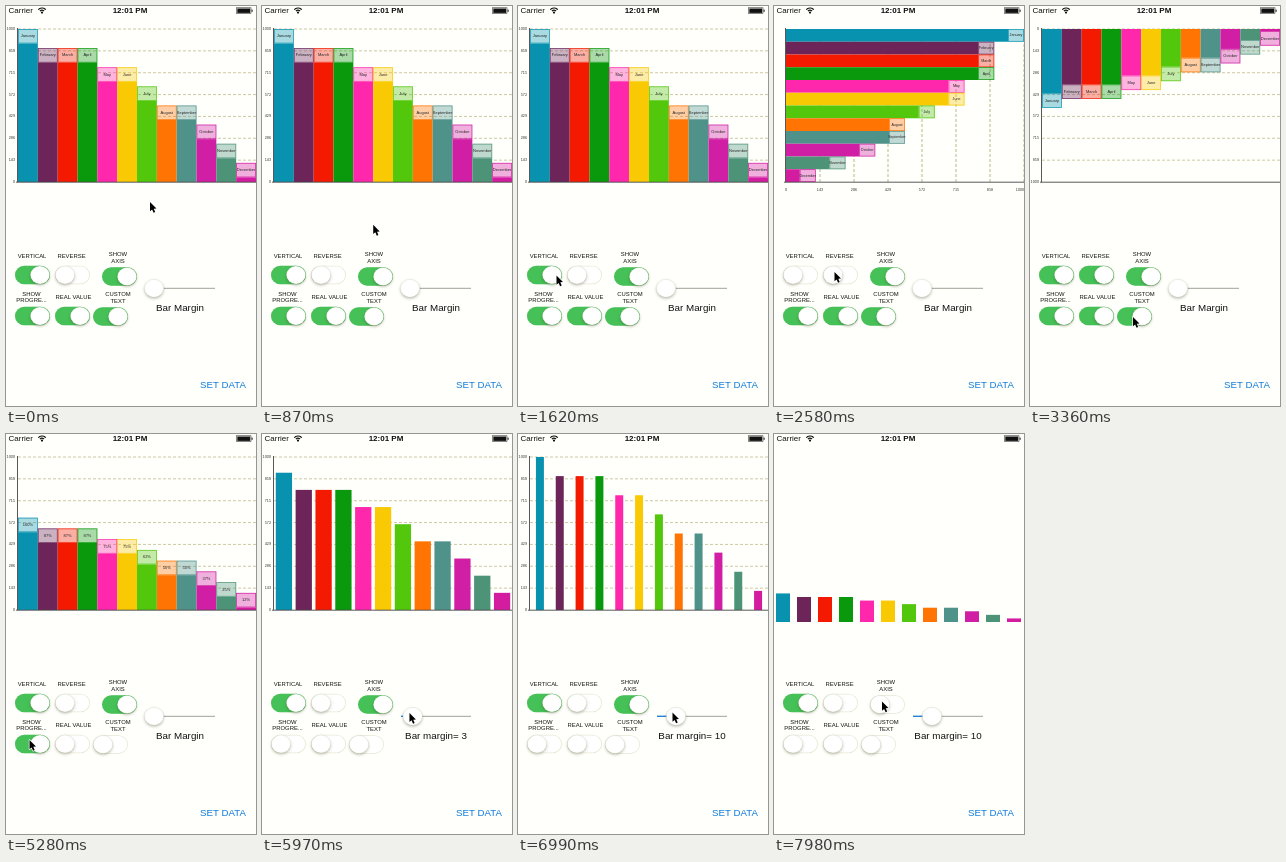
Write an HTML page with a canvas that moves like this. It is 250x400 px and loops after 8000 ms.

```html
<!DOCTYPE html>
<html lang="en">
<head>
<meta charset="utf-8">
<title>Bar chart demo</title>
<style>
  html, body { margin: 0; width: 100%; height: 100%; overflow: hidden; background: #fff; }
  canvas { display: block; width: 250px; height: 400px; }
</style>
</head>
<body>
<canvas id="stage"></canvas>
<script>
const W = 250, H = 400, LOOP = 8000, GROW = 800, FLIP = 180;
const canvas = document.getElementById('stage');
const ctx = canvas.getContext('2d');
const ratio = Math.max(1, window.devicePixelRatio || 1);
canvas.width = W * ratio;
canvas.height = H * ratio;

const FONT = '"Liberation Sans", Arial, sans-serif';
const MAX = 1000;
const BARS = [
  ['January', 1000, '#0992b0'], ['February', 875, '#6c2459'],
  ['March', 875, '#f41a02'], ['April', 875, '#0a990d'],
  ['May', 750, '#ff28ac'], ['June', 750, '#f9c904'],
  ['July', 625, '#52c70c'], ['August', 500, '#ff7403'],
  ['September', 500, '#4f928a'], ['October', 375, '#d01fa4'],
  ['November', 250, '#4c9378'], ['December', 125, '#d41ca0']
].map(([name, value, color]) => ({ name, value, color }));

const SWITCHES = [
  { key: 'vertical', x: 9, y: 269, label: ['VERTICAL'], lx: 26, ly: 250 },
  { key: 'reverse', x: 49, y: 269, label: ['REVERSE'], lx: 65.5, ly: 250 },
  { key: 'axis', x: 96, y: 270.5, label: ['SHOW', 'AXIS'], lx: 112, ly: 248.5 },
  { key: 'progress', x: 9, y: 310, label: ['SHOW', 'PROGRE...'], lx: 25.5, ly: 288 },
  { key: 'real', x: 49, y: 310, label: ['REAL VALUE'], lx: 67.5, ly: 291 },
  { key: 'custom', x: 87, y: 310.5, label: ['CUSTOM', 'TEXT'], lx: 112, ly: 288.5 }
];
const START = { vertical: true, reverse: false, axis: true, progress: true, real: true, custom: true };
const CLICKS = [
  [1650, 'vertical'], [2610, 'reverse'], [2980, 'vertical'], [3380, 'custom'],
  [4230, 'real'], [4848, 'reverse'], [5330, 'progress'], [7772, 'axis']
];
const DRAG = { from: 5900, to: 6170, value: 10 };

// time, x, y of the pointer tip
const PATH = [
  [0, 144, 196], [500, 144, 196], [1500, 38.5, 269.5], [1680, 38.5, 269.5],
  [2100, 60.5, 266], [2640, 60.5, 266], [2920, 34, 269], [3010, 34, 269],
  [3330, 103, 311], [3420, 103, 311], [3950, 62, 315], [4270, 62, 315],
  [4720, 62, 268], [4870, 62, 268], [5200, 23.5, 306], [5400, 23.5, 306],
  [5840, 146, 279], [5900, 146, 279], [6170, 154.5, 278.5], [7240, 154.5, 278.5],
  [7700, 108, 267.5], [LOOP, 108, 267.5]
];

const clamp = v => Math.min(1, Math.max(0, v));
const ease = v => { v = clamp(v); return v * v * (3 - 2 * v); };
const mix = (a, b, k) => a + (b - a) * k;

function stateAt(t) {
  const s = { ...START, knob: {}, since: -GROW };
  for (const [at, key] of CLICKS) {
    if (t < at) break;
    s[key] = !s[key];
    s.since = at;
    s.knob[key] = ease((t - at) / FLIP);
  }
  s.drag = clamp((t - DRAG.from) / (DRAG.to - DRAG.from));
  s.margin = Math.round(s.drag * DRAG.value);
  if (t >= DRAG.to) s.since = Math.max(s.since, DRAG.to);
  s.grow = ease((t - s.since) / GROW);
  return s;
}

function text(str, x, y, size, { color = '#111', align = 'center', weight = 'normal' } = {}) {
  ctx.font = `${weight} ${size}px ${FONT}`;
  ctx.textAlign = align;
  ctx.textBaseline = 'middle';
  ctx.fillStyle = color;
  ctx.fillText(str, x, y);
}

function line(x1, y1, x2, y2, color, width = 1, dash = []) {
  ctx.beginPath();
  ctx.setLineDash(dash);
  ctx.moveTo(x1, y1);
  ctx.lineTo(x2, y2);
  ctx.strokeStyle = color;
  ctx.lineWidth = width;
  ctx.stroke();
  ctx.setLineDash([]);
}

function pill(x, y, w, h, fill) {
  ctx.beginPath();
  ctx.roundRect(x, y, w, h, h / 2);
  ctx.fillStyle = fill;
  ctx.fill();
}

function knob(x, y) {
  ctx.save();
  ctx.shadowColor = 'rgba(60,60,30,.35)';
  ctx.shadowBlur = 3 * ratio;
  ctx.shadowOffsetY = 1.3 * ratio;
  ctx.beginPath();
  ctx.ellipse(x, y, 9.6, 8.9, 0, 0, Math.PI * 2);
  ctx.fillStyle = '#fff';
  ctx.fill();
  ctx.restore();
  ctx.strokeStyle = 'rgba(120,120,80,.2)';
  ctx.lineWidth = 0.5;
  ctx.stroke();
}

function drawStatus() {
  text('Carrier', 2.5, 4.8, 8, { align: 'left' });
  text('12:01 PM', 124, 4.8, 8, { weight: 'bold' });
  ctx.strokeStyle = '#111';
  ctx.lineWidth = 1.2;
  for (const r of [2.8, 5]) {
    ctx.beginPath();
    ctx.arc(36, 7, r, -Math.PI * 0.77, -Math.PI * 0.23);
    ctx.stroke();
  }
  ctx.beginPath();
  ctx.arc(36, 6.6, 1.1, 0, Math.PI * 2);
  ctx.fillStyle = '#111';
  ctx.fill();
  ctx.lineWidth = 0.5;
  ctx.strokeRect(230.5, 1.8, 14.5, 5.8);
  ctx.fillRect(231.3, 2.5, 12.9, 4.4);
  ctx.fillRect(245.6, 3.6, 1, 2.2);
}

function frameOf(s) {
  return s.axis ? { x: 12, y: 23, w: 238, h: 153 } : { x: 0, y: 19, w: 250, h: 169 };
}

function drawGrid(s, f) {
  for (let i = 0; i <= 7; i++) {
    const k = i / 7;
    const value = Math.ceil(MAX * (s.reverse ? 1 - k : k));
    if (s.vertical) {
      const y = f.y + f.h * (1 - k);
      if (i) line(f.x, y, W, y, '#bfbc8e', 0.8, [3, 2]);
      text(value, 9, y, 3.8, { color: '#333', align: 'right' });
    } else {
      const x = f.x + f.w * k;
      if (i) line(x, f.y, x, f.y + f.h, '#aaa768', 0.8, [3, 2]);
      text(value, Math.min(x, 246), 183.5, 3.8, { color: '#333' });
    }
  }
}

function drawAxes(f) {
  line(f.x - 0.5, f.y - 1, f.x - 0.5, f.y + f.h, '#444', 0.9);
  line(f.x - 2, f.y + f.h + 0.2, W, f.y + f.h + 0.2, '#444', 0.9);
}

function caption(bar, s) {
  if (s.custom) return bar.name;
  return s.real ? String(bar.value) : Math.floor(bar.value / MAX * 100) + '%';
}

// Rectangle covering a stretch [a, b] measured from the base line of a bar
function span(s, f, cross, size, a, b) {
  if (s.vertical) {
    const y = s.reverse ? f.y + a : f.y + f.h - b;
    return [cross, y, size, b - a];
  }
  const x = s.reverse ? f.x + f.w - b : f.x + a;
  return [x, cross, b - a, size];
}

function drawBars(s, f) {
  const across = s.vertical ? f.w : f.h;
  const along = s.vertical ? f.h : f.w;
  const pitch = s.axis ? across / BARS.length : 21;
  const gap = (s.axis ? 11.85 : 7) * s.margin / DRAG.value;
  const size = pitch - gap;
  const first = s.axis ? (s.vertical ? f.x : f.y) + gap / 2 : 2;
  const tag = s.progress ? (s.vertical ? 14.5 : 16) : 0;

  BARS.forEach((bar, i) => {
    const cross = first + i * pitch;
    const solid = (along * bar.value / MAX - tag) * s.grow;
    ctx.fillStyle = bar.color;
    ctx.fillRect(...span(s, f, cross, size, 0, solid));
    if (!tag) return;

    const [x, y, w, h] = span(s, f, cross, size, solid, solid + tag);
    ctx.globalAlpha = 0.35;
    ctx.fillRect(x, y, w, h);
    ctx.globalAlpha = 0.85;
    ctx.strokeStyle = bar.color;
    ctx.lineWidth = 0.8;
    ctx.strokeRect(x + 0.4, y + 0.4, w - 0.8, h - 0.8);
    ctx.globalAlpha = 1;
    text(caption(bar, s), x + w / 2, y + h / 2, s.vertical ? 4 : 3.6, { color: '#222' });
  });
}

function drawSwitch(sw, s) {
  const turn = s.knob[sw.key] ?? 1;
  const on = s[sw.key] ? turn : 1 - turn;
  const top = sw.y - 9.3;
  pill(sw.x, top, 35, 18.6, '#e9e8d4');
  pill(sw.x + 0.8, top + 0.8, 33.4, 17, '#fff');
  ctx.globalAlpha = on;
  pill(sw.x, top, 35, 18.6, '#45c157');
  ctx.globalAlpha = 1;
  knob(mix(sw.x + 10, sw.x + 25, on), sw.y);
  sw.label.forEach((row, i) => text(row, sw.lx, sw.ly + i * 6.5, 5.9));
}

function drawSlider(s) {
  const x = mix(148, 158, s.drag);
  line(139, 282.3, 209, 282.3, '#b3b3ac', 1.2);
  if (s.drag > 0) line(139, 282.3, x, 282.3, '#1280e0', 1.2);
  knob(x, 282.3);
  text(s.drag > 0 ? `Bar margin= ${s.margin}` : 'Bar Margin', 174, 302.3, 9.8);
}

function drawPointer(t) {
  const i = Math.max(1, PATH.findIndex(p => p[0] > t));
  const [t0, x0, y0] = PATH[i - 1], [t1, x1, y1] = PATH[i];
  const k = ease((t - t0) / (t1 - t0));
  ctx.save();
  ctx.translate(mix(x0, x1, k), mix(y0, y1, k));
  ctx.beginPath();
  [[0, 0], [0, 9.2], [2.1, 7.4], [3.6, 10.8], [5.2, 10.1], [3.8, 6.8], [6.5, 6.6]]
    .forEach(p => ctx.lineTo(...p));
  ctx.closePath();
  ctx.lineJoin = 'round';
  ctx.strokeStyle = '#fff';
  ctx.lineWidth = 1.4;
  ctx.stroke();
  ctx.fillStyle = '#000';
  ctx.fill();
  ctx.restore();
}

function draw(t) {
  const s = stateAt(t), f = frameOf(s);
  ctx.setTransform(ratio, 0, 0, ratio, 0, 0);
  ctx.fillStyle = '#fffffc';
  ctx.fillRect(0, 0, W, H);
  drawStatus();
  if (s.axis) drawGrid(s, f);
  drawBars(s, f);
  if (s.axis) drawAxes(f);
  SWITCHES.forEach(sw => drawSwitch(sw, s));
  drawSlider(s);
  text('SET DATA', 217, 379.2, 9.7, { color: '#0f7ddb' });
  drawPointer(t);
}

const begin = performance.now();
function tick() {
  draw((performance.now() - begin) % LOOP);
  requestAnimationFrame(tick);
}
tick();
</script>
</body>
</html>
```
